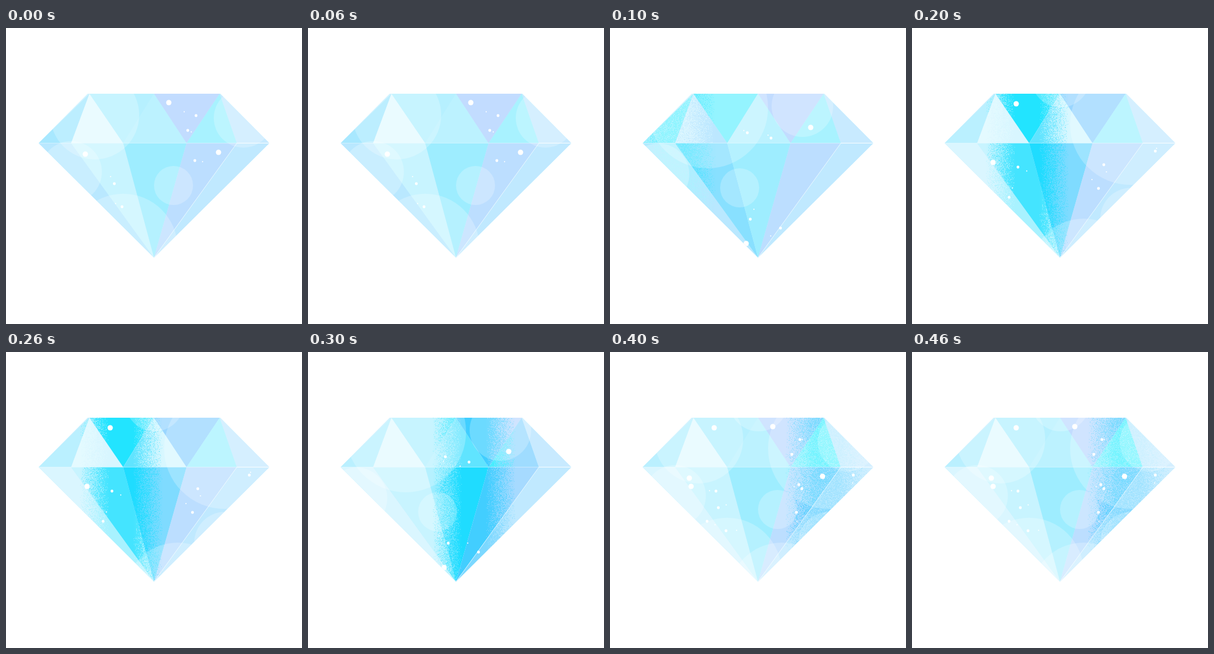
An HTML page with a canvas that plays this animation: 500x500 px, repeating every 500 ms.

```html
<!DOCTYPE html>
<html lang="en">
<head>
<meta charset="utf-8">
<title>Diamond</title>
<style>
html, body { margin: 0; height: 100%; overflow: hidden; background: #fff; }
canvas { display: block; }
</style>
</head>
<body>
<canvas id="stage" width="500" height="500"></canvas>
<script>
const SIZE = 500, STEP = 100, STEPS = 5, TOP = 111, GIRDLE = 194.5;
const tip = [250, 388];
const [t1, t2, t3] = [141, 250, 361].map(x => [x, TOP]);
const girdle = [55, 110, 198, 305, 390, 445].map(x => [x, GIRDLE]);
const [left, g1, g2, g3, g4, right] = girdle;
const outline = [[138, TOP], [362, TOP], right, tip, left];

// Each run of three points along the zigzag is a crown facet.
const zigzag = [left, g1, t1, g2, t2, g3, t3, g4, right];
const crown = zigzag.slice(2).map((p, i) => [zigzag[i], zigzag[i + 1], p]);
const pavilion = girdle.slice(1).map((p, i) => [girdle[i], p, tip]);

// Per facet: resting colour, colour inside the sweep, colour just ahead of it.
const palette = `
  baf0ff 62f1ff a8e8ff, e4faff d8f6ff a8e0ff, b6f0ff 22e4ff 74f0ff, bcf2ff 60e4ff d8f7ff,
  c2dcff 40ceff 9ad6ff, a8f2ff 3cf0ff 9fdcff, c8eaff a6e4ff c8eaff,
  daf6ff a8f2ff b9e8ff, c8f4ff 44e4ff 88e0ff, 9eedff 1fdcff 7fdbff, bcdeff 42ceff a6daff,
  c0e9ff 7cd8ff c0e9ff`.split(',').map(s => s.trim().split(' ').map(c => '#' + c));
const facets = [...crown, ...pavilion].map((points, i) => ({ points, colours: palette[i] }));

// Light patterns: soft discs [x, y, radius], big and middling sparkles [x, y].
const patterns = {
  a: {
    discs: [[110, 243, 52], [283, 266, 33], [401, 152, 50], [150, 147, 75], [198, 372, 92]],
    big: [[275, 126], [359, 210], [134, 213]],
    small: [[321, 148], [307, 173], [319, 224], [183, 263], [196, 302]]
  },
  b: {
    discs: [[325, 132, 52], [165, 135, 102], [82, 247, 52], [219, 270, 33]],
    big: [[339, 168], [230, 364]],
    small: [[232, 177], [272, 186], [237, 323], [288, 338]]
  },
  c: {
    discs: [[369, 163, 102], [370, 322, 52], [290, 412, 90], [251, 84, 50]],
    big: [[176, 128], [137, 227]],
    small: [[179, 235], [164, 286], [324, 231], [315, 271], [411, 208]]
  }
};
const order = ['a', 'b', 'c', 'b', 'ac'];

function seeded(seed) {
  return () => (seed = (seed * 16807) % 2147483647) / 2147483647;
}

function trace(ctx, points) {
  ctx.beginPath();
  points.forEach(([x, y]) => ctx.lineTo(x, y));
  ctx.closePath();
}

function disc(ctx, x, y, radius, alpha = 1) {
  ctx.fillStyle = `rgba(255,255,255,${alpha})`;
  ctx.beginPath();
  ctx.arc(x, y, radius, 0, 7);
  ctx.fill();
}

function line(ctx, from, to, alpha) {
  ctx.strokeStyle = `rgba(255,255,255,${alpha})`;
  ctx.beginPath();
  ctx.moveTo(...from);
  ctx.lineTo(...to);
  ctx.stroke();
}

// A grainy band of light travels from left to right, brightest mid-way.
function sweepAt(step) {
  const centre = 22 + 86 * step;
  const strength = Math.min(1, 1.2 * Math.sin(Math.PI * step / STEPS));
  return {
    centre,
    light: x => strength * Math.max(0, Math.min(1, 1.4 - Math.abs(x - centre) / 50))
  };
}

function paintFacet(ctx, { points, colours: [rest, lit, ahead] }, sweep, random) {
  const xs = points.map(p => p[0]), ys = points.map(p => p[1]);
  const lead = (xs[0] + xs[1] + xs[2]) / 3 - sweep.centre;
  ctx.save();
  trace(ctx, points);
  ctx.fillStyle = lead > 30 && lead < 118 ? ahead : rest;
  ctx.fill();
  ctx.clip();
  ctx.fillStyle = lit;
  for (let x = Math.min(...xs); x < Math.max(...xs); x++) {
    const light = sweep.light(x);
    if (!light) continue;
    for (let y = Math.floor(Math.min(...ys)); y < Math.max(...ys); y++) {
      ctx.globalAlpha = (light + (random() < light)) / 2;
      ctx.fillRect(x, y, 1, 1);
    }
  }
  ctx.restore();
}

function paintSparkles(ctx, { big, small }, random) {
  const near = v => v + (random() - 0.5) * 40;
  big.forEach(([x, y]) => disc(ctx, x, y, 4.5));
  small.forEach(([x, y]) => {
    disc(ctx, x, y, 2.4);
    disc(ctx, near(x), near(y), 1);
  });
}

function render(keys, step) {
  const canvas = document.createElement('canvas');
  canvas.width = canvas.height = SIZE;
  const ctx = canvas.getContext('2d');
  const random = seeded(step + 71), sweep = sweepAt(step);
  const shown = [...keys].map(key => patterns[key]);
  trace(ctx, outline);
  ctx.fillStyle = '#c4efff';
  ctx.fill();
  ctx.clip();
  facets.forEach(facet => paintFacet(ctx, facet, sweep, random));
  shown.forEach(({ discs }) => discs.forEach(d => disc(ctx, ...d, 0.23)));
  line(ctx, left, g4, 0.35);
  line(ctx, g4, right, 0.9);
  line(ctx, g4, tip, 0.65);
  shown.forEach(pattern => paintSparkles(ctx, pattern, random));
  return canvas;
}

const images = order.map(render);
const stage = document.getElementById('stage').getContext('2d');
const start = performance.now();

function draw() {
  const step = Math.floor((performance.now() - start) / STEP) % STEPS;
  stage.clearRect(0, 0, SIZE, SIZE);
  stage.drawImage(images[step], 0, 0);
  requestAnimationFrame(draw);
}
draw();
</script>
</body>
</html>
```
